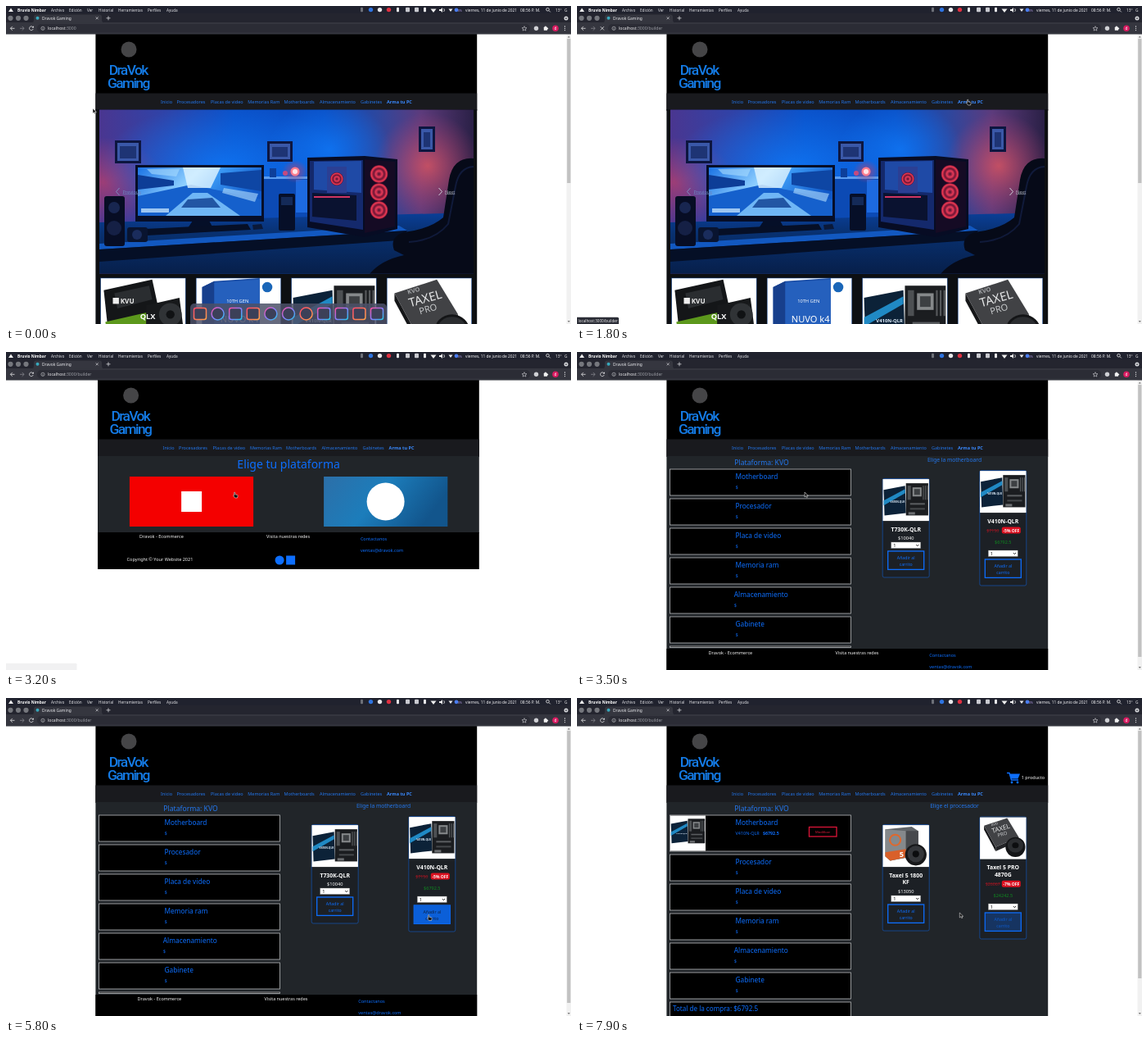
An HTML page for the animation above (8 s loop, 690 by 388 pixels).

```html
<!DOCTYPE html>
<html lang="es">
<head>
<meta charset="utf-8">
<title>Dravok Gaming</title>
<style>
html, body { margin: 0; width: 100%; height: 100%; overflow: hidden; background: #fff; }
svg { display: block; width: 100vw; height: 100vh; font-family: "Noto Sans", "Open Sans", sans-serif; }
text { white-space: pre; }
</style>
</head>
<body>
<svg id="stage" viewBox="0 0 690 388"></svg>
<script>
const LOOP = 8000, STEP = 100;
const LEFT = 109.4, WIDTH = 465.8;
const BLUE = '#0d6efd', LINK = '#2377ee', BODY = '#212529';
const stage = document.getElementById('stage');

const rect = (x, y, w, h, fill, more = '') => `<rect x="${x}" y="${y}" width="${w}" height="${h}" fill="${fill}" ${more}/>`;
const circ = (x, y, r, fill, more = '') => `<circle cx="${x}" cy="${y}" r="${r}" fill="${fill}" ${more}/>`;
const oval = (x, y, rx, ry, fill) => `<ellipse cx="${x}" cy="${y}" rx="${rx}" ry="${ry}" fill="${fill}"/>`;
const poly = (points, fill, more = '') => `<polygon points="${points}" fill="${fill}" ${more}/>`;
const line = (d, color, width = 0.8, more = '') => `<path d="${d}" fill="none" stroke="${color}" stroke-width="${width}" ${more}/>`;
const text = (x, y, str, size, fill, more = '') => `<text x="${x}" y="${y}" font-size="${size}" fill="${fill}" ${more}>${str}</text>`;
const band = (y, h, fill) => rect(LEFT, y, WIDTH, h, fill);
const group = (id, inner) => `<g id="${id}">${inner}</g>`;
const stops = (...list) => list.map(([o, c, a = 1]) => `<stop offset="${o}" stop-color="${c}" stop-opacity="${a}"/>`).join('');
const mid = 'text-anchor="middle"', bold = 'font-weight="700"', semi = 'font-weight="500"';

const defs = `<defs>
<linearGradient id="wall">${stops([0, '#4a3690'], [.2, '#2b45ac'], [.36, '#0a50c8'], [.6, '#0a4ec4'], [.74, '#2c479f'], [.86, '#5d3b7c'], [1, '#2a2046'])}</linearGradient>
<linearGradient id="desk" x2="0" y2="1">${stops([0, '#0a3f98'], [.35, '#08306f'], [1, '#071f4a'])}</linearGradient>
<radialGradient id="pink">${stops([0, '#b8406e', .75], [1, '#b8406e', 0])}</radialGradient>
<radialGradient id="coral">${stops([0, '#dc5560', .8], [1, '#b8406e', 0])}</radialGradient>
<radialGradient id="glow">${stops([0, '#0f74f2', .9], [1, '#0f74f2', 0])}</radialGradient>
<radialGradient id="fan">${stops([0, '#4a1030'], [.35, '#e83a58'], [.6, '#6a1434'], [.85, '#f23a54'], [1, '#5a1030'])}</radialGradient>
<linearGradient id="screen" x2="1" y2=".4">${stops([0, '#1a72e4'], [.45, '#8fd0ff'], [.6, '#3a98f4'], [1, '#1058c8'])}</linearGradient>
<linearGradient id="tile" x2="1" y2=".3">${stops([0, '#2c6fa8'], [.5, '#1c7dbb'], [1, '#12558c'])}</linearGradient>
<linearGradient id="neon" x2="1" y2="1">${stops([0, '#ff4fa0'], [.5, '#8a7cff'], [1, '#25c6e8'])}</linearGradient>
<linearGradient id="warm" x2="1" y2="1">${stops([0, '#ff4b6a'], [1, '#ffa04a'])}</linearGradient>
<clipPath id="view"><rect width="690" height="388"/></clipPath>
<clipPath id="hero"><rect x="114" y="126.5" width="457" height="200"/></clipPath>
</defs>`;

// Product pictures, each on a 56 x 51 white field
const pics = {
  board: poly('1,13 27,8 28,41 2,44', '#0c2238') + poly('1,26 27,12 27,17 1,32', '#2089c4') +
    text(9, 29, 'V410N-QLR', 3.2, '#e4f2ff', bold) + rect(28, 5, 27, 39, '#1b1d20') +
    rect(36, 10, 11, 11, '#85888a') + rect(38, 12, 7, 7, '#3d4043') + rect(30, 8, 4, 17, '#4d5053') +
    [49, 51.5, 54].map(x => rect(x - .5, 8, 1.2, 17, '#55585b')).join('') +
    rect(33, 29, 18, 2, '#5a5d60') + rect(33, 35, 18, 2, '#44474a') + rect(31, 40, 8, 3, '#6b6e71'),
  pro: poly('5,10 19,36 19,41 5,15', '#161719') + poly('19,36 47,24 47,29 19,41', '#232427') + poly('5,10 33,1 47,24 19,36', '#414245') +
    `<g transform="rotate(-16 14 18)">${text(16, 11, 'KVO', 4, '#a4a6a9', bold)}${text(15, 19.5, 'TAXEL', 8, '#e6e7e8', semi)}${text(20, 26, 'PRO', 6, '#c6c8ca')}</g>` +
    oval(43, 36, 12, 12, '#141517') + oval(43, 34, 9.5, 8.5, '#2b2d30') + oval(43, 34, 4, 3.5, '#0d0e10'),
  five: poly('3,5 35,2 43,7 43,37 9,43 3,38', '#606468') + poly('3,5 28,7 28,39 9,43 3,38', '#85898c') +
    poly('28,7 43,7 43,37 28,40', '#47494d') + circ(15, 18, 6.5, 'none', 'stroke="#e0682c" stroke-width="2"') +
    poly('3,33 28,29 28,39 9,43 3,38', '#d9602a') + text(20, 39, '5', 9, '#fff', bold) +
    circ(40, 36, 13, '#17181a') + circ(40, 35, 10, '#34363a') + circ(40, 35, 4, '#0c0d0f'),
  gpu: poly('2,8 34,1 39,24 5,36', '#141618') + poly('9,10 32,5 34,14 11,20', '#2a2d30') + poly('3,29 38,21 39,30 5,38', '#5c981c') +
    poly('30,18 52,13 55,36 30,36', '#17191b') + circ(46, 24, 7.5, '#303336') + circ(46, 24, 2.8, '#101214') +
    rect(8, 13, 4, 4, '#eee') + text(13, 17, 'KVU', 4.4, '#eee', bold) + text(26, 27, 'QLX', 5, '#fff', bold),
  chip: poly('4,6 12,2 42,0 42,40 4,40', '#1c4fa8') + poly('4,6 12,2 12,40 4,40', '#173f8c') + poly('12,3 42,1 42,40 12,40', '#2560bd') +
    circ(47, 6, 3.4, '#1a66b8') + text(20, 16.5, '10TH GEN', 3.1, '#fff', semi) + text(16, 29, 'NUVO k4', 6, '#fff', semi)
};
const pic = (name, x, y, w, h = w * 51 / 56) =>
  rect(x, y, w, h, '#fff') + `<g transform="translate(${x} ${y}) scale(${w / 56})">${pics[name]}</g>`;

function chrome() {
  let s = rect(0, 0, 690, 10, '#20222e') + rect(0, 9, 690, 13, '#24252f') + rect(0, 20, 690, 14.5, '#35363f');
  s += poly('3,7 6,2.5 9,7', '#eee') + text(14, 6.6, 'Bruvio Nimbar', 4.75, '#fff', bold);
  for (const [x, label] of [[55, 'Archivo'], [77, 'Edición'], [99, 'Ver'], [113, 'Historial'], [137, 'Herramientas'], [173, 'Perfiles'], [196, 'Ayuda']])
    s += text(x, 6.6, label, 4.65, '#e4e5e8');
  ['#6d7078', '#2f74e0', '#e8e8ea', '#e03040', '#e8e8ea', '#c9cad0', '#c9cad0', '#e8e8ea'].forEach((c, i) => {
    const x = 434.5 + i * 11;
    s += i % 4 == 0 || i > 4 ? rect(x - 1.5, 1.8, i > 4 && i < 7 ? 5 : 3, 5.4, c, 'rx="1"') : circ(x, 4.6, 2.7, c);
  });
  s += poly('518.5,3.5 525.5,3.5 522,8', '#eee') + poly('529,4 531,4 533,2 533,8 531,6 529,6', '#eee') +
    line('M534.5 3q2 2 0 4', '#eee') + poly('540.5,3.5 545.5,3.5 543,7', '#eee') + circ(550, 4.8, 2.4, '#4a7df0') +
    text(552, 7, '0%', 3.5, '#b9a4f0');
  s += text(561, 6.5, 'viernes, 11 de junio de 2021', 4.8, '#f2f2f4') + text(628, 6.5, '08:56 P. M.', 4.9, '#f2f2f4') +
    circ(661.5, 4.2, 1.8, 'none', 'stroke="#eee" stroke-width=".8"') + line('M663 5.6l1.8 1.8', '#eee') +
    text(671, 6.5, '13°', 4.8, '#eee') + text(682, 6.5, 'G', 4.8, '#eee');
  for (const x of [5.5, 15, 24.5]) s += circ(x, 14.8, 3.1, '#75777d');
  s += `<path d="M31 20.5q3 0 3-4v-3q0-3 3-3h77q3 0 3 3v3q0 4 3 4z" fill="#35363f"/>`;
  s += circ(38.5, 14.8, 2, '#38a9bd') + text(44, 16.8, 'Dravok Gaming', 4.9, '#e8e9ec') +
    line('M109.7 13.3l3 3m0-3l-3 3', '#d4d5d8', .7) + line('M122.5 14.8h5m-2.5-2.5v5', '#d4d5d8', .8) + circ(684, 15, 2.5, '#d9dadd') + poly('682.6,14.4 685.4,14.4 684,16.2', '#24252f');
  s += rect(38, 22, 602, 10.5, '#2b2c35', 'rx="5"');
  s += line('M10.5 27.3h-5m2.3-2.4l-2.4 2.4l2.4 2.4', '#e6e6e8') + line('M17 27.3h5m-2.3-2.4l2.4 2.4l-2.4 2.4', '#85868d');
  s += group('reload', line('M33 26a2.4 2.4 0 1 0 .2 2', '#e6e6e8') + poly('31.6,26.5 33.9,26.5 33.9,24.2', '#e6e6e8'));
  s += group('stop', line('M28.7 25.2l4.2 4.2m0-4.2l-4.2 4.2', '#e6e6e8'));
  s += circ(45, 27.3, 2.1, 'none', 'stroke="#b8b9be" stroke-width=".7"') + line('M45 26.8v1.8', '#b8b9be', .7);
  s += `<text x="51" y="29.2" font-size="5.1" fill="#f0f0f2">localhost<tspan fill="#9a9ca3" id="path"></tspan></text>`;
  s += poly('633,24.6 633.8,26.6 636,26.7 634.3,28 634.9,30.1 633,28.9 631.1,30.1 631.7,28 630,26.7 632.2,26.6', 'none', 'stroke="#d0d1d5" stroke-width=".6"');
  s += circ(647.5, 27.3, 2.7, '#d0d1d5') + rect(656.8, 25.6, 4.2, 4.2, '#f0f0f0', 'rx=".6"') + circ(658.9, 25.4, 1, '#f0f0f0') + circ(661.2, 27.6, 1, '#f0f0f0');
  s += circ(671, 27.2, 3.8, '#d81b60') + text(671, 29, 'd', 4.6, '#fff', mid);
  for (const y of [25, 27.3, 29.6]) s += circ(682.5, y, .65, '#e6e6e8');
  return s;
}

function header() {
  const brand = (y, str) => text(149.3, y, str, 17.4, '#147be6', `${mid} font-family="Roboto, sans-serif" font-weight="500" letter-spacing="-1.6"`);
  let s = band(34, 94, '#000') + band(106.5, 20.5, '#191a1e');
  s += circ(150, 53, 9.5, '#454547') + brand(84.3, 'DraVok') + brand(100, 'Gaming');
  const items = [[189, 'Inicio'], [208.5, 'Procesadores'], [250, 'Placas de video'], [295.3, 'Memorias Ram'], [339.5, 'Motherboards'], [383, 'Almacenamiento'], [433, 'Gabinetes']];
  for (const [x, label] of items) s += text(x, 118.6, label, 5.5, LINK, semi);
  return s + text(465, 118.6, 'Arma tu PC', 5.5, '#3a8aff', bold);
}

function scrollbar(end) {
  return rect(684.5, 34.5, 5.5, 353.5, '#f1f1f1') + rect(685.2, 40, 4.2, end - 40, '#c1c1c1') +
    poly('685.8,38.5 688.8,38.5 687.3,36.5', '#777') + poly('685.8,384 688.8,384 687.3,386', '#777');
}

function hero() {
  const frame = (x, y, w, h) => rect(x, y, w, h, '#0d1640') + rect(x + 3, y + 3, w - 6, h - 6, '#3a58a8') + rect(x + 6, y + 7, w - 12, h - 13, '#1e3474');
  let s = rect(114, 126, 457, 201, 'url(#wall)');
  s += oval(118, 215, 75, 55, 'url(#pink)') + oval(515, 195, 65, 65, 'url(#coral)') + oval(265, 195, 150, 75, 'url(#glow)') + oval(395, 175, 75, 60, 'url(#glow)');
  s += frame(133, 164, 32, 28) + frame(319, 165, 31, 25) + frame(504, 147, 20, 31);
  s += rect(310, 209, 60, 50, '#0c4ab4') + rect(312, 208, 58, 3, '#5a9cf0') + rect(354, 212, 16, 40, '#1d6ae0') + oval(353, 202, 16, 14, 'url(#pink)');
  s += circ(353, 202, 5.5, '#ff7d90') + circ(353, 202, 3, '#ffe4e8') + circ(341, 204, 3, '#c44b80') + rect(322, 198, 8, 11, '#0d3f9a');
  s += poly('114,264 571,252 571,327 114,327', 'url(#desk)') + poly('114,290 480,268 490,274 114,297', '#1258c0') + poly('114,297 490,274 480,286 114,312', '#050f26');
  s += rect(158, 194, 157, 69, '#060e28') + rect(161, 197, 151, 59, 'url(#screen)') +
    poly('161,232 226,218 312,236 312,256 161,256', '#1560cc') + poly('216,197 262,197 250,222 222,222', '#e2f5ff', 'opacity=".8"') +
    poly('161,206 205,213 205,219 161,224', '#0d3d97') + poly('262,204 312,200 312,226 262,218', '#0e46a4') +
    poly('172,199 212,199 208,208 178,205', '#a8dcff', 'opacity=".6"') + poly('266,222 308,229 304,239 264,228', '#b4e0ff', 'opacity=".6"') +
    poly('195,256 228,228 246,228 286,256', '#86ccff', 'opacity=".8"') + poly('222,236 252,234 262,246 214,246', '#0f3f90', 'opacity=".8"') + rect(165, 247, 34, 5, '#cbe8ff', 'opacity=".75"');
  s += poly('228,262 248,262 253,271 222,271', '#050f28') + poly('170,272 295,266 299,273 172,280', '#060f26') + poly('301,267 312,266 314,272 302,273', '#0b1939');
  s += rect(120, 232, 25, 61, '#070d24', 'rx="3"') + circ(132, 246, 7, '#182650') + circ(132, 271, 9, '#152045') + rect(148, 270, 25, 18, '#091430', 'rx="3"') + circ(160, 279, 6, '#1a2c5c');
  s += rect(333, 229, 20, 45, '#060f28', 'rx="2"') + rect(336, 233, 14, 10, '#142a58');
  s += poly('368,185 438,183 478,187 478,272 438,282 368,270', '#070c24') + poly('371,189 436,188 436,273 371,263', '#14296c') +
    poly('376,190 434,189 434,228 376,224', '#1f4aa6') + poly('374,228 428,231 428,262 374,257', '#0a1230') + rect(392, 196, 24, 32, '#2b3f94') +
    poly('438,187 475,190 475,269 438,277', '#150b24') + rect(376, 232, 44, 2, '#d03562') + circ(404, 211, 8, 'url(#fan)');
  for (const y of [205, 227, 249]) s += circ(455.5, y, 11, 'url(#fan)');
  s += `<path d="M571 186Q546 184 541 212L534 258Q518 272 486 276Q468 282 474 298L486 304Q458 310 444 327H571Z" fill="#060a18"/>` +
    line('M571 196Q553 197 549 220L540 266Q524 286 492 288', '#101a3a', 2);
  s += line('M138.5 222l-4 4.5l4 4.5', '#7f92c4', .9) + line('M528.5 222l4 4.5l-4 4.5', '#d5d8e0', .9);
  s += text(142.5, 228.5, 'Previous', 5.6, '#6f86bf', 'text-decoration="underline"') + text(536, 228.5, 'Next', 5.6, '#b0b4c0', 'text-decoration="underline"');
  return `<g clip-path="url(#hero)">${s}</g>`;
}

function home() {
  let s = band(126, 262, '#0d0f12') + hero();
  ['gpu', 'chip', 'board', 'pro'].forEach((name, i) => {
    s += pic(name, 115.7 + i * 116.5, 332, 103.5) + rect(115.7 + i * 116.5, 332, 103.5, 70, 'none', 'stroke="#134a9c" stroke-width=".5"');
  });
  return header() + s + scrollbar(216);
}

function footer(y) {
  return `<g transform="translate(0 ${y})">` + band(0, 45, '#000') +
    text(160.5, 6.6, 'Dravok - Ecommerce', 5.55, '#f4f4f4') + text(315.5, 6.6, 'Visita nuestras redes', 5.45, '#f4f4f4') +
    text(430.3, 9.6, 'Contactanos', 5.5, BLUE) + text(430.3, 23.6, 'ventas@dravok.com', 5.5, BLUE) +
    text(145, 35, 'Copyright © Your Website 2021', 5.5, '#f4f4f4') + circ(331.5, 34, 5.5, BLUE) + rect(339.5, 28.5, 11, 11, BLUE) + '</g>';
}

function picker() {
  const s = header() + band(127, 94, BODY) + text(342.5, 142, 'Elige tu plataforma', 14, BLUE, mid) +
    rect(148.3, 152, 151.2, 61, '#f40000') + rect(211.5, 170, 25, 25, '#fff') +
    rect(385.5, 152, 151.2, 61, 'url(#tile)') + circ(461, 182.5, 23, '#fff') + footer(220);
  return `<g transform="translate(2.6 0)">${s}</g>`;
}

const parts = ['Motherboard', 'Procesador', 'Placa de video', 'Memoria ram', 'Almacenamiento', 'Gabinete'];
const rowBox = (y, h) => rect(113.5, y, 221, h, '#000', 'stroke="#b9bbbd" stroke-width=".8"');

function rows(filled) {
  let s = text(225.5, 137.8, 'Plataforma: KVO', 8.6, LINK, mid + ' ' + semi), y = 143;
  parts.forEach((name, i) => {
    const full = filled && i == 0, h = full ? 44 : 32, x = i == 4 ? 191.8 : 193.5;
    s += rowBox(y, h) + text(x, y + 12, name, 8.3, BLUE, semi);
    if (full) s += pic('board', 114, y + .5, 43, 43) + text(x, y + 24.2, 'V410N-QLR', 5.5, BLUE) + text(227, y + 24.2, '$6792.5', 5.3, BLUE, bold) +
      rect(283.5, y + 14.5, 33.5, 11.5, '#000', 'stroke="#dc1438" stroke-width="1.3"') + text(300.2, y + 21.6, 'Modificar', 4.1, '#e01a3c', mid);
    else s += text(x, y + 24, '$', 5.7, BLUE, semi);
    y += h + 4;
  });
  s += rowBox(y, filled ? 24 : 1.5);
  return filled ? s + text(117, 382.3, 'Total de la compra: $6792.5', 8.1, BLUE, semi) : s;
}

// Product card; x is its centre, y its top
function card(c) {
  const { x, y, end, picture, title, price, sale, id } = c;
  let s = rect(x - 28.5, y, 57, end - y, '#1c2025', 'rx="2" stroke="#1355b4" stroke-width=".7"') + pic(picture, x - 28.2, y + .6, 56.4, 51), at = y + 64;
  for (const row of title) { s += text(x, at, row, 6.9, '#fff', `${mid} font-weight="600"`); at += 8.6; }
  if (sale) {
    s += text(x - 12.5, at + 2.5, sale.old, 5.3, '#a51522', mid + ' text-decoration="line-through"') +
      rect(x - 1.5, at - 3.5, 23, 8, '#dc1020', 'rx="2"') + text(x + 10, at + 2.4, sale.cut, 5, '#fff', `${mid} ${bold}`) +
      text(x, at + 17, price, 5.5, '#0f8a20', mid);
  } else s += text(x, at + 2, price, 5.7, '#fff', mid);
  const sel = end - 43, btn = end - 32, box = [x - 22, btn, 44, 22.4];
  s += rect(x - 18, sel, 36, 7.5, '#fff', 'stroke="#777" stroke-width=".4"') + text(x - 15.5, sel + 5.8, '1', 5.6, '#000') + line(`M${x + 12.5} ${sel + 3}l1.6 1.7l1.6-1.7`, '#111', .9);
  s += rect(...box, '#1c2025', `stroke="${BLUE}" stroke-width="1.3"`);
  const label = (fill, more = '') => `<g ${more}>` + text(x, btn + 9.6, 'Añadir al', 5.2, fill, mid) + text(x, btn + 17.6, 'carrito', 5.2, fill, mid) + '</g>';
  if (!id) return s + label(BLUE);
  return s + rect(...box, '#0b5fd8', `id="${id}"`) + label(BLUE, `id="${id}Off"`) + label('#0c2346', `id="${id}On"`);
}

function builder(filled) {
  let s = header() + band(127, 261, BODY) + rows(filled);
  s += text(461, 134.3, filled ? 'Elige el procesador' : 'Elige la motherboard', 6.7, LINK, mid + ' ' + semi);
  if (filled) {
    s += card({ x: 401.7, y: 154.5, end: 284, picture: 'five', title: ['Taxel 5 1800', 'KF'], price: '$13050' }) +
      card({ x: 520.3, y: 145, end: 294, picture: 'pro', title: ['Taxel 5 PRO', '4870G'], price: '$24242.5', sale: { old: '$26067', cut: '-7% OFF' }, id: 'cpu' });
    s += line('M525 91.5h3l2.5 8.5h8.5', BLUE, 1.4) + poly('528,92.5 541,92.5 538.5,98.5 530,98.5', BLUE) + circ(531, 103, 1.4, BLUE) + circ(538, 103, 1.4, BLUE) +
      text(542.8, 99, '1 producto', 5.5, '#fff');
  } else {
    s += card({ x: 401.7, y: 154.5, end: 275, picture: 'board', title: ['T730K-QLR'], price: '$10040' }) +
      card({ x: 520.3, y: 144.5, end: 285, picture: 'board', title: ['V410N-QLR'], price: '$6792.5', sale: { old: '$7150', cut: '-5% OFF' }, id: 'mb' }) + footer(362);
  }
  return s + scrollbar(filled ? 342 : 372);
}

function dock() {
  let s = rect(225, 363, 240, 34, '#4c5068', 'rx="5" opacity=".85"');
  for (let i = 0; i < 11; i++) {
    const x = 237 + i * 21.6, paint = `stroke="url(#${i % 3 ? 'neon' : 'warm'})" stroke-width="1.5"`;
    s += [1, 4, 5, 6].includes(i) ? circ(x, 375.5, 7.5, '#3c4058', paint) : rect(x - 7.5, 368.5, 15, 14, '#3c4058', `rx="2.5" ${paint}`);
  }
  return s;
}

const arrow = `<path d="M0 0v6l1.5-1.3l1 2l1-.5l-1-1.9h1.9z" fill="#111" stroke="#eee" stroke-width=".55"/>`;
const hand = `<path d="M1 0q.9 0 .9 1v1.8l2.6.6q.8.3.6 1.3l-.6 2.3h-2.9l-2-2.6q0-1 1-.4v-3q0-1 .4-1z" fill="#111" stroke="#eee" stroke-width=".55"/>`;

stage.innerHTML = defs + '<g clip-path="url(#view)">' + rect(0, 0, 690, 388, '#fff') +
  group('home', home()) + group('picker', picker()) + group('empty', builder(false)) + group('filled', builder(true)) +
  chrome() + group('dock', dock()) +
  group('status', rect(-2, 379.8, 53, 10, '#2b2d36', 'rx="1.5"') + text(1.5, 385.8, 'localhost:3000/builder', 4.6, '#e6e6e8')) +
  group('haze', rect(-2, 379.8, 88.5, 10, '#f1f1f2', 'rx="1.5"')) +
  group('mouse', group('arrow', arrow) + group('hand', hand)) + '</g>';

const $ = Object.fromEntries([...stage.querySelectorAll('[id]')].map(n => [n.id, n]));
const show = (id, on) => $[id].style.display = on ? '' : 'none';
const clamp = v => Math.max(0, Math.min(1, v));
const ease = v => v * v * (3 - 2 * v);

// Pointer path: time, x, y
const path = [[0, 106, 125], [1500, 476, 114], [2300, 476, 114], [3100, 278, 171], [4000, 278, 171], [4600, 327, 163],
  [4900, 344, 166], [5600, 515, 264.5], [7600, 515, 264.5], [7900, 467.3, 262]];

function pointer(t) {
  const i = path.findIndex(p => p[0] > t);
  if (i < 0) return path[path.length - 1].slice(1);
  const [t0, x0, y0] = path[i - 1], [t1, x1, y1] = path[i], k = ease((t - t0) / (t1 - t0));
  return [x0 + (x1 - x0) * k, y0 + (y1 - y0) * k];
}

function hover(id, k) {
  const dark = clamp(k * 1.5 - .3);
  $[id].setAttribute('opacity', k);
  $[id + 'On'].setAttribute('opacity', dark);
  $[id + 'Off'].setAttribute('opacity', 1 - dark);
}

function render(t) {
  show('home', t < 1900);
  show('picker', t >= 1900 && t < 3500);
  show('empty', t >= 3500 && t < 6200);
  show('filled', t >= 6200);
  const loading = t >= 1700 && t < 2100;
  show('stop', loading);
  show('reload', !loading);
  $.path.textContent = ':3000' + (t >= 1700 ? '/builder' : '');
  show('dock', t < 400);
  $.dock.setAttribute('transform', `translate(0 ${t / 12})`);
  show('status', t >= 1500 && t < 2500);
  show('haze', t >= 3100 && t < 3500);
  hover('mb', clamp((t - 5400) / 200));
  hover('cpu', t < 7700 ? clamp((t - 6200) / 500) : 1 - (t - 7700) / 300);
  const [x, y] = pointer(t);
  const over = t >= 1500 && t < 2400 || t >= 3000 && t < 3500 || t >= 5500 && t < 6200;
  show('hand', over);
  show('arrow', !over);
  $.mouse.setAttribute('transform', `translate(${x} ${y})`);
}

// The screen is refreshed ten times a second
const start = performance.now();
function tick() {
  const t = (performance.now() - start) % LOOP;
  render(Math.floor(t / STEP) * STEP);
  requestAnimationFrame(tick);
}
tick();
</script>
</body>
</html>
```
